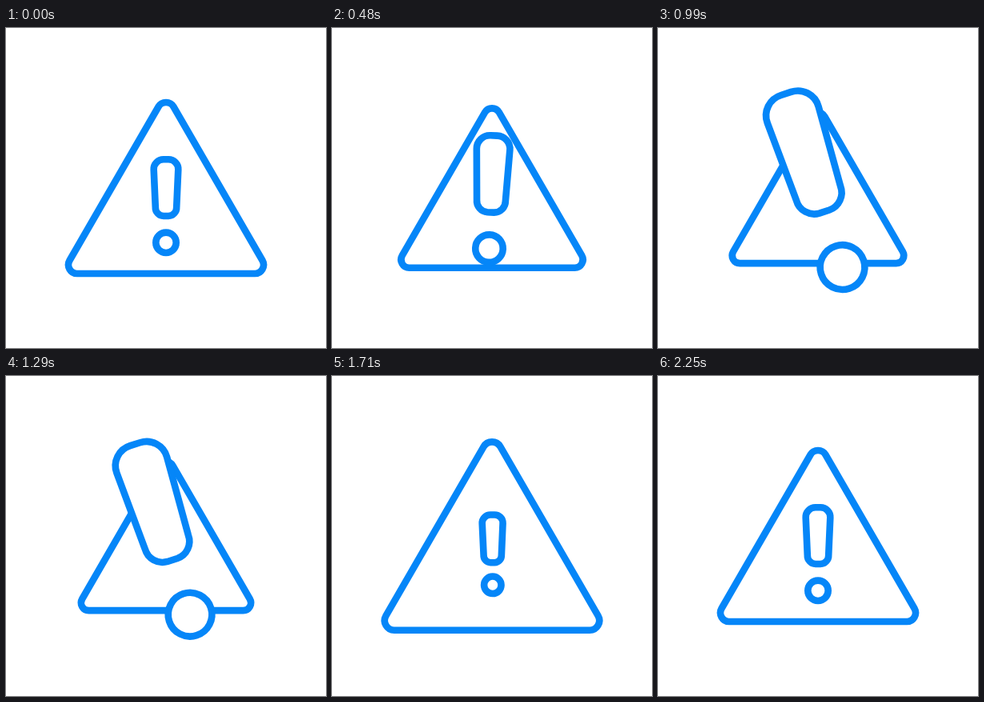
Animation of 400 by 400 pixels, one loop 2.28 s. Source, as an HTML page:

```html
<!DOCTYPE html>
<html>
<head>
<meta charset="utf-8">
<style>
  html, body { margin: 0; width: 100%; height: 100%; overflow: hidden; background: #fff; }
  svg { display: block; width: 100vw; height: 100vh; }
  path, circle { fill: #fff; stroke: #0586f8; stroke-width: 8.6; vector-effect: non-scaling-stroke; }
</style>
</head>
<body>
<svg viewBox="0 0 400 400">
  <path id="triangle" d="M-120.5 90.5L-9.5 -101.5A11 11 0 0 1 9.5 -101.5L120.5 90.5A11 11 0 0 1 111 107H-111A11 11 0 0 1 -120.5 90.5Z"/>
  <g id="mark">
    <path d="M-3 -58.7H3A12.2 12.2 0 0 1 15.3 -46L13.2 1A10.5 10.5 0 0 1 3 12H-3A10.5 10.5 0 0 1 -13.2 1L-15.3 -46A12.2 12.2 0 0 1 -3 -58.7Z"/>
    <circle cy="45.3" r="12.7"/>
  </g>
</svg>
<script>
const STEP = 30, STEPS = 76;
const PEAK = 40; // step at which the left swing is widest

// Eased 0 to 1 between two steps; the swings arrive early, the settling is more even
function rise(step, start, end) {
  const u = Math.min(1, Math.max(0, (step - start) / (end - start)));
  const bias = start < PEAK ? .55 : .15;
  const p = u + bias * u * (1 - u);
  return p * p * (3 - 2 * p);
}

// How much of each pose is in the mix; release is when the left swing lets go
function poses(step, release) {
  const on = (start, end) => rise(step, start, end);
  const right = on(0, 10) - on(10, 20);
  const left = on(20, PEAK) - on(release, 55);
  const dip = on(release, 55) - on(55, 65);
  const lift = on(10, 20) - on(20, PEAK) + on(55, 65) - on(65, 75);
  return { right, left, dip, lift, swing: right + left };
}

function triangleTransform(step) {
  const { swing, dip, lift } = poses(step, PEAK + 5);
  const size = 1 - .13 * swing - .055 * lift + .123 * dip;
  return `translate(200 200) scale(${size})`;
}

function markTransform(step) {
  const { right, left, swing, dip, lift } = poses(step, PEAK);
  const x = 200 + dip - 1.2 * lift;
  const y = 223 - 20.3 * swing - 6.4 * lift + dip;
  const angle = 18 * right - 20.5 * left - lift;
  const scale = 1 + 1.35 * swing + .145 * lift - .2 * dip;
  return `translate(${x} ${y}) rotate(${angle}) scale(${scale})`;
}

const triangle = document.getElementById('triangle');
const mark = document.getElementById('mark');
const origin = performance.now();

function draw() {
  const step = Math.floor((performance.now() - origin) / STEP) % STEPS;
  triangle.setAttribute('transform', triangleTransform(step));
  mark.setAttribute('transform', markTransform(step));
  requestAnimationFrame(draw);
}
draw();
</script>
</body>
</html>
```
